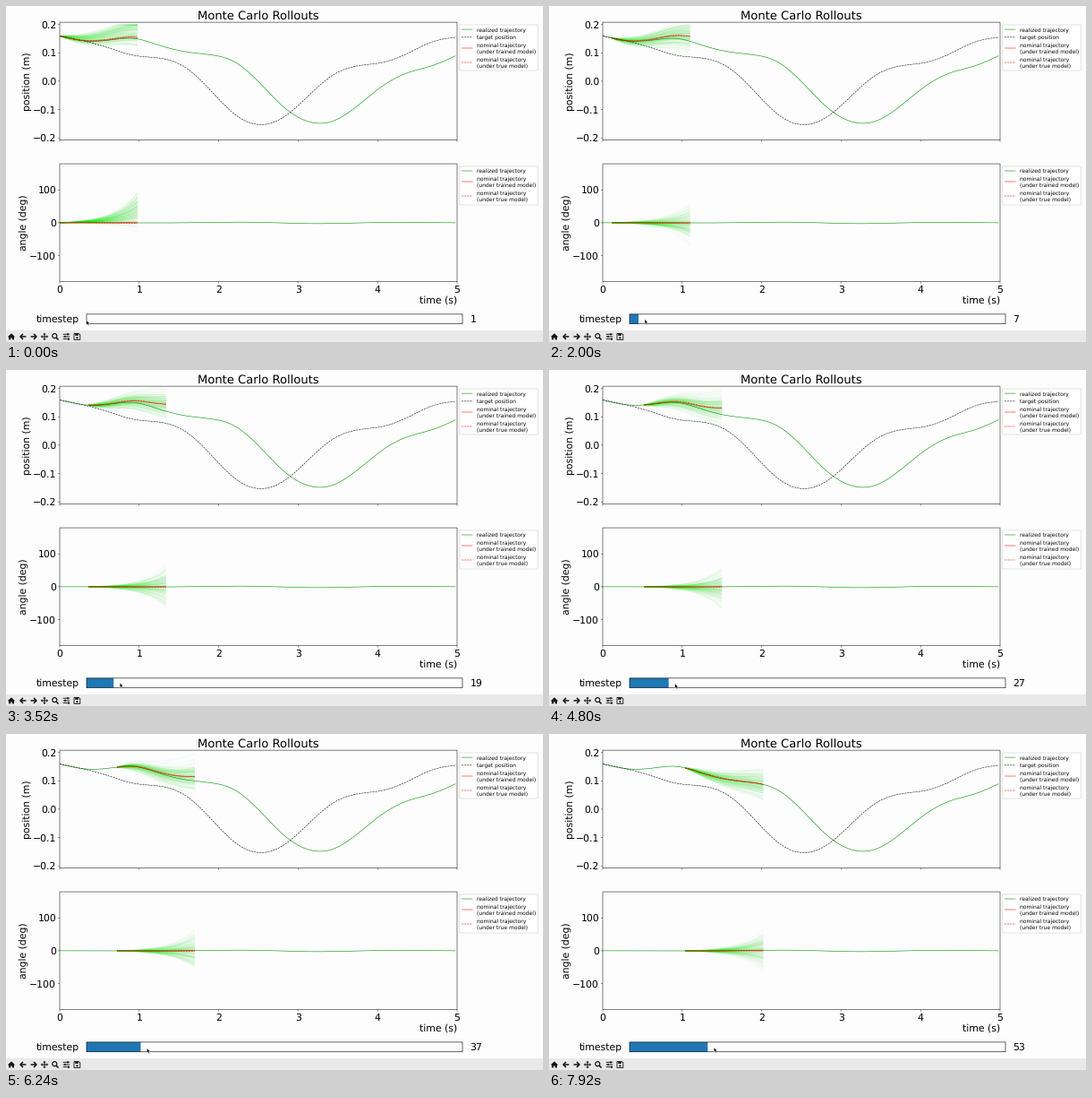
A matplotlib script that plays this animation: 600 by 375 pixels, repeating every 8000 ms.

```python
import numpy as np
import matplotlib as mpl
import matplotlib.pyplot as plt
from matplotlib.animation import FuncAnimation
from matplotlib.collections import LineCollection
from matplotlib.patches import Circle, FancyBboxPatch, Polygon, Rectangle

W, H, DPI = 600, 375, 100
FRAMES, STEP_MS = 100, 80
PT = 72 / DPI                      # points per pixel
CANVAS = 362                       # height above the toolbar
LEFT, RIGHT = 0.1 * W, 0.84 * W
PER_STEP = (RIGHT - LEFT) / 250    # pixels per 0.02 s
PLOT_H = 0.8 * CANVAS / 2.2
POS_TOP = 0.05 * CANVAS
ANG_TOP = POS_TOP + 1.2 * PLOT_H
POS_MID, ANG_MID = POS_TOP + PLOT_H / 2, ANG_TOP + PLOT_H / 2
HORIZON, ROLLOUTS = 50, 200
THIN = 0.58
GREEN, FAN, RED, BLUE = "#009400", "#00ee00", "#ff1000", "#1f77b4"
INK, PANEL = "#111111", "#e9e9e9"

mpl.rcParams.update({
    "font.family": "DejaVu Sans",
    "text.hinting": "none",
    "path.snap": False,
    "toolbar": "None",
})

fig = plt.figure(figsize=(W / DPI, H / DPI), dpi=DPI, facecolor="#fdfdfd")
ax = fig.add_axes([0, 0, 1, 1])
ax.set_xlim(0, W)
ax.set_ylim(H, 0)
ax.axis("off")


def label(x, y, text, size=10.9, ha="left", va="baseline", **kw):
    return ax.text(x, y, text, fontsize=size * PT, ha=ha, va=va,
                   color="black", **kw)


def line(xs, ys, color=INK, style="-", width=THIN, z=3):
    return ax.plot(xs, ys, color=color, lw=width * PT, ls=style, zorder=z,
                   solid_capstyle="butt")[0]


def box(x, y, w, h, fill="none", edge="none", width=0.5, z=6):
    return ax.add_patch(Rectangle((x, y), w, h, fc=fill, ec=edge,
                                  lw=width * PT, zorder=z))


def shape(points, color=INK, z=11, **kw):
    return ax.add_patch(Polygon(points, fc=color, zorder=z,
                                **{"ec": "none", **kw}))


def spline(ys):
    """Natural cubic spline through evenly spaced heights across the plot."""
    ys = np.array(ys, float)
    n = len(ys)
    system = 4 * np.eye(n) + np.eye(n, k=1) + np.eye(n, k=-1)
    system[0] = np.eye(n)[0]
    system[-1] = np.eye(n)[-1]
    bend = np.linalg.solve(system, np.r_[0, 6 * np.diff(ys, 2), 0])

    def curve(x):
        s = (np.asarray(x) - LEFT) / (RIGHT - LEFT) * (n - 1)
        i = np.clip(s.astype(int), 0, n - 2)
        b = s - i
        a = 1 - b
        return (a * ys[i] + b * ys[i + 1]
                + ((a**3 - a) * bend[i] + (b**3 - b) * bend[i + 1]) / 6)
    return curve


position = spline([33.5, 38.9, 38.1, 36.3, 43.7, 50.7, 54.2, 61.8, 84.3,
                   112.3, 128.9, 128.4, 111.2, 89.3, 74.6, 66.6, 54.8])
target = spline([33.5, 39.2, 47, 55.2, 58.1, 67.6, 92, 119.8, 132.3,
                 124.3, 100.6, 77.1, 66.8, 63, 53, 40, 34.8])


def angle(x):
    swell = np.exp(-((x - 330) / 130) ** 2)
    return ANG_MID + swell * np.sin((x - 300) * np.pi / 100)


def draw_axes(top, values, per_unit, form, name, name_x):
    mid, bottom = top + PLOT_H / 2, top + PLOT_H
    box(LEFT, top, RIGHT - LEFT, PLOT_H, edge="black")
    for x in np.linspace(LEFT, RIGHT, 6):
        line([x, x], [bottom, bottom + 1.9], width=0.45)
    for v in values:
        y = mid - v * per_unit
        line([LEFT - 1.9, LEFT], [y, y], width=0.45)
        label(56.2, y + 3.9, form.format(v).replace("-", "\u2212"),
              ha="right")
    label(name_x, mid, name, ha="center", va="center", rotation=90)


def draw_legend(top, bottom, entries):
    pad = 1
    ax.add_patch(FancyBboxPatch(
        (506.5 + pad, top + pad), 88 - 2 * pad, bottom - top - 2 * pad,
        boxstyle=f"round,pad={pad},rounding_size=1.2",
        fc="white", ec="#cccccc", lw=0.55 * PT, zorder=6))
    for y, color, style, *rows in entries:
        line([509, 521.5], [y, y], color, style, z=7)
        first = y + 2.2 - 3.3 * (len(rows) - 1)
        for i, row in enumerate(rows):
            label(526, first + 6.9 * i, row, 6, zorder=7)


def nominals(y):
    return [(y + 16 * i, RED, style, "nominal trajectory",
             f"(under {model} model)")
            for i, (style, model) in enumerate([("-", "trained"),
                                                ("--", "true")])]


label((LEFT + RIGHT) / 2, 15.6, "Monte Carlo Rollouts", 13.1, ha="center")
draw_axes(POS_TOP, (0.2, 0.1, 0, -0.1, -0.2), PLOT_H / 0.416, "{:.1f}",
          "position (m)", 23.2)
draw_axes(ANG_TOP, (100, 0, -100), PLOT_H / 360, "{}", "angle (deg)", 19.2)
for n, x in enumerate(np.linspace(LEFT, RIGHT, 6)):
    label(x, 319.8, str(n), ha="center")
label(RIGHT, 331.8, "time (s)", ha="right")

draw_legend(21, 72, [(26.1, GREEN, "-", "realized trajectory"),
                     (34.8, INK, "--", "target position"), *nominals(47)])
draw_legend(179, 222, [(184, GREEN, "-", "realized trajectory"),
                       *nominals(196)])

xs = np.linspace(LEFT, RIGHT - PER_STEP, 500)
line(xs, position(xs), GREEN)
line(xs, angle(xs), GREEN)
line(xs, target(xs), INK, "--", z=4)

# Slider
SLIDER_X, SLIDER_W = 0.15 * W, 0.7 * W
SLIDER_Y, SLIDER_H = 0.95 * CANVAS, 0.03 * CANVAS
label(81.6, 353, "timestep", ha="right")
bar = box(SLIDER_X, SLIDER_Y, 0, SLIDER_H, fill=BLUE, z=5)
box(SLIDER_X, SLIDER_Y, SLIDER_W, SLIDER_H, edge="black", width=0.6)
count = label(518.4, 353, "1")


def draw_toolbar():
    box(0, CANVAS, W, H - CANVAS, fill=PANEL, z=9)
    y = 369

    def stroke(px, py, width=1.5):
        line(px, py, width=width, z=11)

    shape([(1.8, y + 0.4), (6, y - 3.6), (10.2, y + 0.4)])
    for x in (3, 6.8):
        box(x, y, 2.2, 3.4, fill=INK, z=11)
    box(3, y, 6, 1.4, fill=INK, z=11)
    for cx, d in ((19, -1), (31, 1)):
        stroke([cx - 3.4 * d, cx + 2.6 * d], [y, y])
        stroke([cx, cx + 3 * d, cx], [y - 3, y, y + 3])
    cx = 43
    stroke([cx - 3, cx + 3], [y, y], 1)
    stroke([cx, cx], [y - 3, y + 3], 1)
    for dx, dy in ((1, 0), (-1, 0), (0, 1), (0, -1)):
        shape([(cx + 4.2 * dx, y + 4.2 * dy),
               (cx + 2.3 * dx + 1.7 * dy, y + 2.3 * dy + 1.7 * dx),
               (cx + 2.3 * dx - 1.7 * dy, y + 2.3 * dy - 1.7 * dx)])
    ax.add_patch(Circle((54.3, y - 0.8), 2.5, fc="none", ec=INK,
                        lw=1.2 * PT, zorder=11))
    stroke([56, 58.6], [y + 1, y + 3.6])
    for dy, knob in ((-2.7, 69), (0, 66), (2.7, 70)):
        stroke([63.8, 71.2], [y + dy, y + dy], 0.9)
        stroke([knob, knob], [y + dy - 1.2, y + dy + 1.2], 1.3)
    shape([(76, y - 3.4), (81.4, y - 3.4), (82.8, y - 2), (82.8, y + 3.4),
           (76, y + 3.4)], PANEL, ec=INK, lw=0.9 * PT)
    box(77.3, y - 3.2, 3.4, 2.2, fill=INK, z=12)
    ax.add_patch(Circle((79.4, y + 1.3), 1.1, fc=INK, zorder=12))


draw_toolbar()

ARROW = np.array([(0, 0), (0, 4.9), (1.1, 4), (1.9, 5.8), (2.8, 5.4),
                  (2, 3.7), (3.5, 3.5)])
cursor = shape(ARROW, "black", z=14, ec="white", lw=0.3 * PT)

# Pace of the drag: (frame, timestep)
DRAG = np.array([(0, 1), (16, 3), (20, 5), (30, 9), (32, 13), (34, 13),
                 (41, 18), (44, 19), (52, 22), (60, 27), (78, 37), (91, 44),
                 (99, 53)])


def make_fan():
    return ax.add_collection(LineCollection(
        [], colors=FAN, linewidths=0.75 * PT, alpha=0.037, zorder=2))


pos_fan, ang_fan = make_fan(), make_fan()
pos_trained, ang_trained = (line([], [], RED, z=4.2) for _ in range(2))
pos_true, ang_true = (line([], [], RED, "--", z=4.3) for _ in range(2))

u = np.linspace(0, 1, HORIZON)
growth = np.expm1(3.4 * u) / np.expm1(3.4)


def bundle(x, ys):
    return np.stack([np.broadcast_to(x, ys.shape), ys], axis=-1)


def update(i):
    drag = np.interp(i, *DRAG.T)
    k = int(drag + 1e-6)
    rng = np.random.default_rng(100 + k)
    x = LEFT + PER_STEP * (k - 1 + np.arange(HORIZON))
    pos, ang = position(x), angle(x)

    drift = -8 * np.sin(np.pi * (k / 53) ** 0.7)
    trained = pos + drift * u ** 3
    pos_trained.set_data(x, trained)
    pos_true.set_data(x, trained - 0.8 * np.sin(np.pi * u))
    ang_trained.set_data(x, ang - 0.2 * u)
    ang_true.set_data(x, ang + 0.7 * u ** 2)

    # The first rollouts lean upwards, then settle around the nominal path.
    lean = max(0, 1 - (k - 1) / 2)
    a, b, c, d = np.clip(rng.normal(size=(4, ROLLOUTS, 1)), -2.4, 2.4)
    spread = 7 * a * u ** 0.85 + 4 * b * u ** 2 - 6 * lean * u
    tilt = 9.8 * c * growth + 1.2 * d * u ** 1.5 - 14 * lean * growth
    pos_fan.set_segments(bundle(x, np.maximum(trained + spread, 21)))
    ang_fan.set_segments(bundle(x, ang + tilt))

    bar.set_width(SLIDER_W * (k - 1) / 250)
    count.set_text(str(k))
    lead = 7 * (1 - np.exp(-i / 6))
    tip = (SLIDER_X + SLIDER_W * (drag - 1) / 250 + lead,
           350 + 0.8 * np.cos(2 * np.pi * i / 78))
    cursor.set_xy(ARROW + tip)
    return (pos_fan, ang_fan, pos_trained, pos_true, ang_trained, ang_true,
            bar, count, cursor)


anim = FuncAnimation(fig, update, frames=FRAMES, interval=STEP_MS,
                     init_func=lambda: update(0), repeat=True,
                     repeat_delay=0, blit=False)
plt.show()
```
